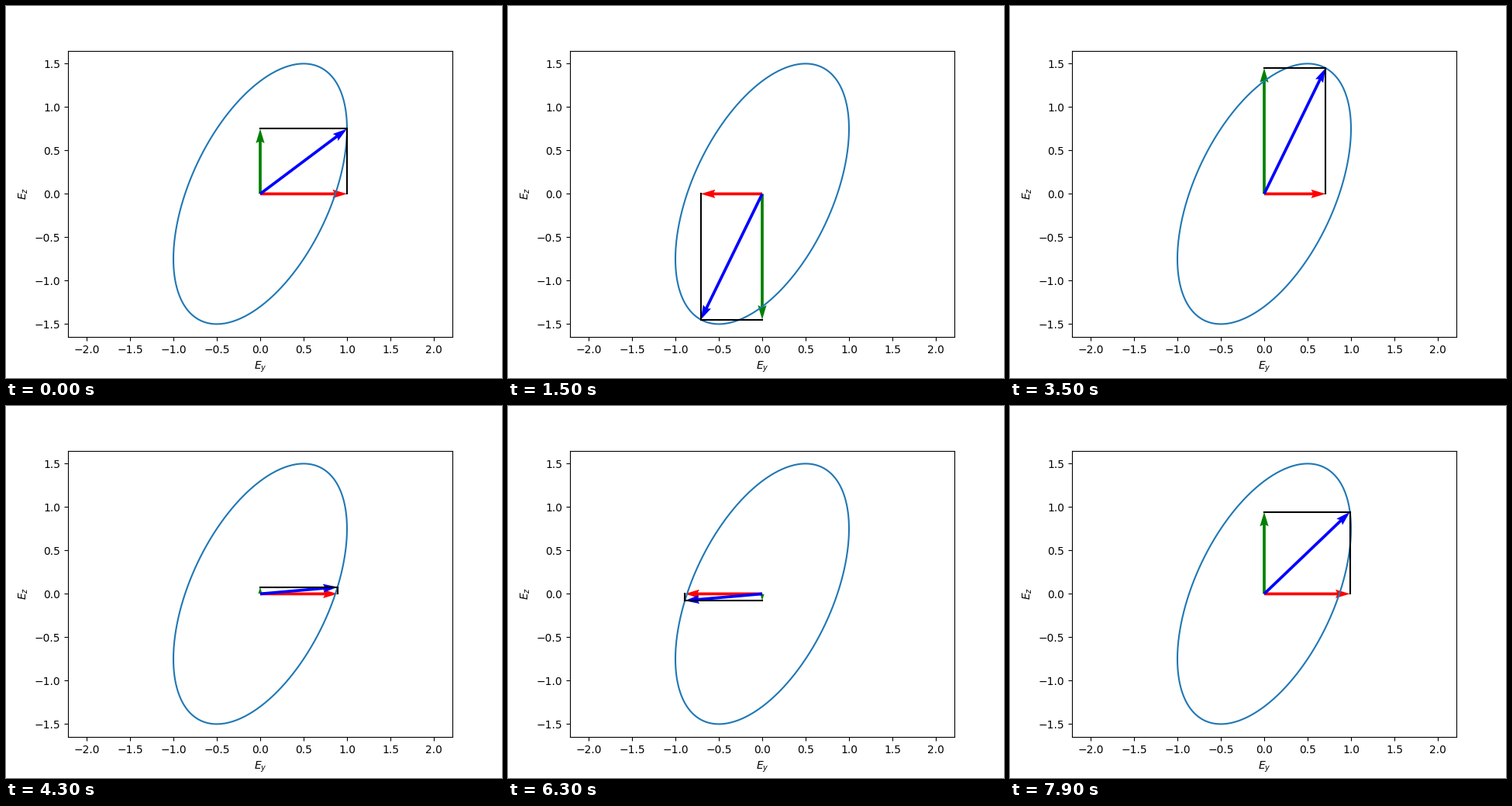
Animation of 640x480 px, one loop 8 s. Source, as a matplotlib script:

```python
import numpy as np
import matplotlib.pyplot as plt
from matplotlib.animation import FuncAnimation

FRAMES, INTERVAL = 80, 100   # one loop lasts 8 s
PERIOD = 40                  # frames per turn
PHASE = np.pi / 3


def field(angle):
    """Field components of an elliptically polarised wave."""
    return np.cos(angle), 1.5 * np.cos(angle + PHASE)


fig, ax = plt.subplots(figsize=(6.4, 4.8), dpi=100)
ax.set_xlim(-248 / 112, 248 / 112)
ax.set_ylim(-1.65, 1.65)
ax.set_xticks(np.arange(-2, 2.1, 0.5))
ax.set_yticks(np.arange(-1.5, 1.6, 0.5))
ax.set_xlabel("$E_y$")
ax.set_ylabel("$E_z$")

ax.plot(*field(np.linspace(0, 2 * np.pi, 400)), color="C0")
side_y, = ax.plot([], [], color="black")
side_z, = ax.plot([], [], color="black")
arrows = ax.quiver(np.zeros(3), np.zeros(3), np.ones(3), np.ones(3),
                   color=["red", "green", "blue"],
                   angles="xy", scale_units="xy", scale=1)


def update(frame):
    ey, ez = field(2 * np.pi * frame / PERIOD)
    arrows.set_UVC([ey, 0, ey], [0, ez, ez])
    side_y.set_data([0, ey], [ez, ez])
    side_z.set_data([ey, ey], [0, ez])
    return arrows, side_y, side_z


anim = FuncAnimation(fig, update, frames=FRAMES, interval=INTERVAL,
                     repeat=True, repeat_delay=0)
plt.show()
```
